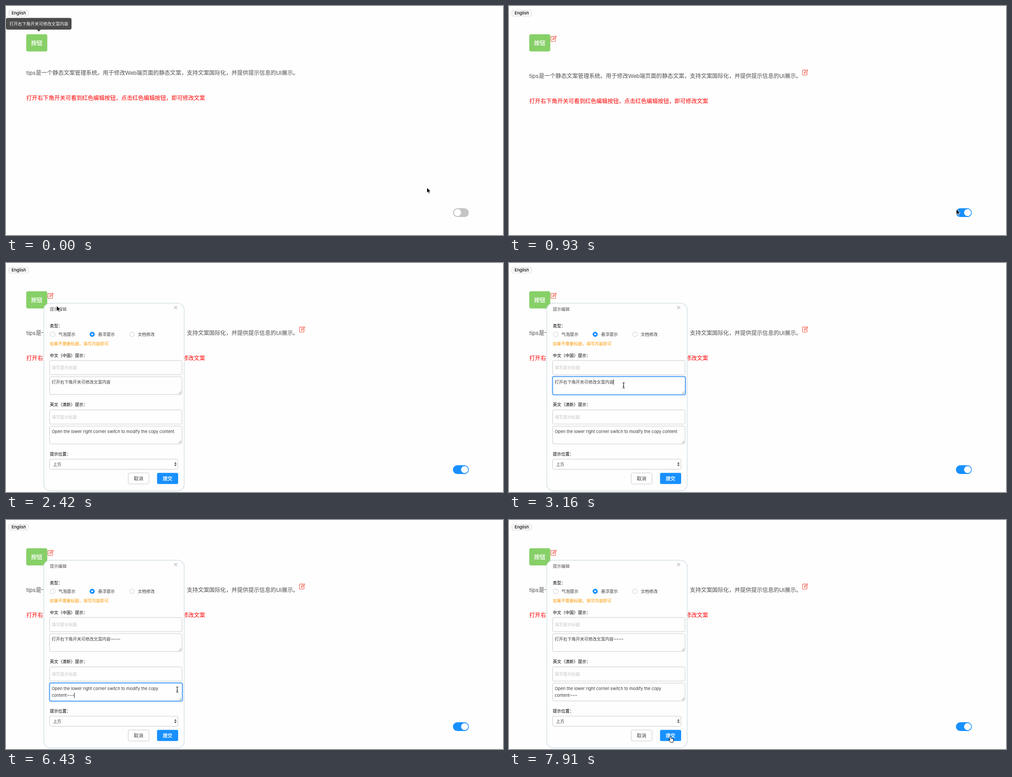
An HTML page for the animation above (8000 ms loop, 1100 px wide and 509 px high).

```html
<!DOCTYPE html>
<html lang="zh-CN">
<head>
<meta charset="utf-8">
<title>tips</title>
<style>
  html, body { margin: 0; width: 100%; height: 100%; overflow: hidden; background: #fefefe; }
  svg { display: block; width: 100%; height: 100%; }
  text { font: 9.29px "Liberation Sans", "Noto Sans CJK SC", "Noto Sans CJK", sans-serif; fill: #3c3c3c; white-space: pre; }
  .page { font-size: 12.36px; fill: #505050; }
  .latin { font-family: Inter, "Open Sans", sans-serif; }
  .lead { font-size: 12px; }
  .english { font-size: 9.24px; }
  .action { font-size: 10.6px; }
  .strong { fill: #fff; stroke: #fff; stroke-width: .3; }
  .label { fill: #000; }
  .hint { fill: #c6c6c6; }
  .box { fill: #fefefe; stroke: #c9c9c9; stroke-width: 1; }
  .ring { fill: none; stroke: #6cb0fb; stroke-width: 2.6; }
  .caret { fill: #111; }
  .edit { fill: none; stroke: #f2523f; stroke-width: 1.1; stroke-linejoin: round; stroke-linecap: round; }
  .pointer { fill: #000; stroke: #fff; stroke-width: 1; stroke-linejoin: round; }
</style>
</head>
<body>
<svg id="stage" viewBox="0 0 1100 509" xmlns="http://www.w3.org/2000/svg"></svg>
<script>
const LOOP = 8000;

const label = (x, y, content, attrs = '') => `<text x="${x}" y="${y}" ${attrs}>${content}</text>`;
const box = (x, y, w, h, attrs = 'class="box"', r = 3) =>
  `<rect x="${x}" y="${y}" width="${w}" height="${h}" rx="${r}" ${attrs}/>`;
const editIcon = (x, y) => `<g class="edit" transform="translate(${x} ${y})">
  <path d="M7.4 1.9H2.2Q.9 1.9 .9 3.2V11.7Q.9 13 2.2 13H9.7Q11 13 11 11.7V6.6"/>
  <path d="M4.7 9.2L5.3 6.8L10.9 1L12.8 2.8L7.1 8.6Z"/></g>`;
const radio = (x, name, on) => `<circle cx="${x}" cy="158.5" r="5.2" fill="${on ? '#1890ff' : '#fefefe'}"
  stroke="${on ? '#1890ff' : '#c9c9c9'}"/>${on ? `<circle cx="${x}" cy="158.5" r="2" fill="#fff"/>` : ''}
  ${label(x + 12.9, 162, name)}`;
const titleField = y => box(96.5, y, 293, 31.5) + label(101.3, y + 19.3, '填写提示标题', 'class="hint"');
const textArea = (y, id) => box(96.5, y, 293, 39.5) +
  box(96.3, y - .5, 294.3, 40.7, `class="ring" id="${id}"`) +
  `<path d="M382.5 ${y + 38}l5.5 -5.5M385.7 ${y + 38}l2.3 -2.3" stroke="#777" stroke-width=".9"/>`;

const page = `
  ${box(6.5, 9.8, 43, 12.4, 'fill="#fff" stroke="#cfcfcf"')}
  ${label(12.2, 19.3, 'English', 'class="latin" style="fill:#000;font-weight:500"')}
  ${box(44.8, 62.7, 46.6, 38.4, 'fill="#87d068"', 4)}
  ${label(55.6, 86.8, '按钮', 'class="page strong"')}
  <g id="copy">
    ${label(45, 153, '<tspan class="latin lead">tips</tspan><tspan x="66">是一个静态文案管理系统。用于修改Web端页面的静态文案，支持文案国际化，并提供提示信息的UI展示。</tspan>', 'class="page"')}
    ${label(45, 208.7, '打开右下角开关可看到红色编辑按钮，点击红色编辑按钮，即可修改文案', 'class="page" style="fill:#f00"')}
  </g>
  <g id="tooltip">
    ${box(0, 26.5, 145, 26, 'fill="#4b4b4b"', 4)}
    <path d="M68 52L72.6 57L77.2 52Z" fill="#4b4b4b"/>
    ${label(7.8, 42.8, '打开右下角开关可修改文案内容', 'style="fill:#fff"')}
  </g>
  <g id="icons">${editIcon(92, 65.7)}${editIcon(648.6, 140.5)}</g>
  ${box(989.2, 449.6, 35.1, 19.4, 'id="track"', 9.7)}
  <circle id="knob" cy="459.3" r="7.8" fill="#fff"/>`;

const dialog = `<g id="dialog">
  ${box(83.5, 89.5, 311, 417, 'fill="#fefefe" stroke="#dce7eb" stroke-width="2"', 15)}
  ${label(97, 106, '提示编辑', 'style="fill:#555"')}
  <path d="M372.2 95.7l6.6 6.6m0 -6.6l-6.6 6.6" stroke="#888" stroke-width="1"/>
  ${label(97, 143, '类型：', 'class="label"')}
  ${radio(103.4, '气泡提示')}${radio(190.8, '悬浮提示', true)}${radio(278.9, '文档修改')}
  ${label(97, 183.4, '如果不需要标题，填写内容即可', 'style="fill:#ff9900"')}
  ${label(97, 208.7, '中文（中国）提示：', 'class="label"')}
  ${titleField(216.7)}${textArea(252.8, 'ringZh')}
  ${label(101.3, 268.4, '打开右下角开关可修改文案内容')}
  ${label(231.4, 268.4, '', 'id="tildesZh"')}
  ${label(97, 318.4, '英文（澳新）提示：', 'class="label"')}
  ${titleField(326.5)}${textArea(362.6, 'ringEn')}
  ${label(101.3, 377.8, '', 'id="lineA" class="latin english"')}
  ${label(101.3, 393.3, 'content', 'id="lineB" class="latin english"')}
  ${label(0, 0, '', 'id="tildesEn"')}
  <rect id="caret" class="caret" width="1" height="11.5"/>
  ${label(97, 428, '提示位置：', 'class="label"')}
  ${box(96.5, 436, 284, 22.5)}
  ${label(104, 451, '上方')}
  <path d="M372.4 446.3L375 442.8L377.6 446.3ZM372.4 448.2L375 451.7L377.6 448.2Z" fill="#444"/>
  ${box(270.5, 466.7, 46, 24.5)}
  ${label(282.7, 482.8, '取消', 'class="action"')}
  ${box(334.3, 466.6, 46.7, 24.7, 'fill="#1890ff"')}
  ${label(347, 482.8, '提交', 'class="action strong"')}
</g>`;

const pointers = `
  <path id="arrow" class="pointer" d="M0 0V12L2.8 9.6L4.6 13.8L6.6 12.9L4.8 8.8H8.6Z"/>
  <path id="hand" class="pointer" style="fill:#fff;stroke:#000"
    d="M3.2 1.2Q4.4 .2 5 1.6L6 5Q7.2 4.3 7.8 5.4Q9 4.8 9.5 5.9Q10.8 5.6 10.9 7.2V10L9.8 13.6H4.4L.9 9.3Q-.2 7.6 1.2 7.4L3.4 8.8L2.4 2.6Q2.4 1.6 3.2 1.2Z"/>
  <path id="beam" d="M-2.6 -6Q0 -6 0 -4.6Q0 -6 2.6 -6M0 -5V5M-2.6 6Q0 6 0 4.6Q0 6 2.6 6M-1.4 1.7H1.4"
    fill="none" stroke="#111" stroke-width="1.1"/>`;

const stage = document.getElementById('stage');
stage.innerHTML = page + dialog + pointers;
const el = Object.fromEntries([...stage.querySelectorAll('[id]')].map(node => [node.id, node]));

// Each row: start time, then the values held until the next row.
const pointerSteps = [
  [0, 'arrow', 931.5, 403.5], [150, 'arrow', 940, 412], [310, 'arrow', 968, 437],
  [460, 'hand', 993, 454], [620, 'hand', 997, 457], [930, 'arrow', 990, 451.5],
  [1080, 'arrow', 380, 250], [1230, 'arrow', 235, 165], [1380, 'arrow', 145, 108],
  [1530, 'arrow', 112, 87], [1670, 'arrow', 104, 81], [1820, 'hand', 98.5, 76],
  [1970, 'hand', 97, 74.2], [2420, 'arrow', 112, 95], [2570, 'arrow', 155, 150],
  [2720, 'arrow', 208, 212], [2870, 'beam', 246, 262], [3010, 'beam', 253.6, 272],
  [4660, 'beam', 290, 298], [4800, 'beam', 352, 346], [4940, 'beam', 381, 370],
  [5090, 'beam', 379.5, 375], [5240, 'beam', 379, 377], [6880, 'beam', 379, 381],
  [7030, 'beam', 377, 390], [7180, 'arrow', 373, 408], [7330, 'arrow', 366, 435],
  [7470, 'arrow', 360, 458], [7620, 'hand', 355, 475], [7770, 'hand', 353, 480.5]
];
const focusSteps = [[0, ''], [3160, 'zh'], [5240, 'en'], [7770, '']];
const zhSteps = [[0, 0], [3910, 1], [4060, 2], [4210, 3], [4510, 4]];
const enSteps = [[0, 0], [5840, 1], [6280, 2], [6430, 3]];
const caretSteps = [[0, true], [3610, false], [3910, true], [4800, false], [5240, true], [6880, false], [7330, true]];

const at = (steps, t) => steps.findLast(step => step[0] <= t).slice(1);
const show = (node, on) => node.setAttribute('visibility', on ? 'visible' : 'hidden');
const place = (node, x, y) => { node.setAttribute('x', x); node.setAttribute('y', y); };
const TILDE = 5.43;

function render(t) {
  const on = t >= 770;
  show(el.tooltip, !on);
  show(el.icons, on);
  el.copy.setAttribute('transform', `translate(0 ${on ? 7.3 : 0})`);
  el.track.setAttribute('fill', on ? '#1890ff' : '#c5c5c5');
  el.knob.setAttribute('cx', on ? 1015 : 999.3);

  el.dialog.style.display = t >= 2270 ? '' : 'none';
  const [focus] = at(focusSteps, t);
  const [zh] = at(zhSteps, t);
  const [en] = at(enSteps, t);
  const wrapped = en > 2;
  show(el.ringZh, focus === 'zh');
  show(el.ringEn, focus === 'en');
  el.tildesZh.textContent = '~'.repeat(zh);
  el.lineA.textContent = 'Open the lower right corner switch to modify the copy' + (wrapped ? '' : ' content');
  show(el.lineB, wrapped);
  el.tildesEn.textContent = '~'.repeat(en);
  const endX = wrapped ? 134.8 : 373.4;
  place(el.tildesEn, endX, wrapped ? 393.3 : 377.8);

  show(el.caret, focus && at(caretSteps, t)[0]);
  if (focus === 'en') place(el.caret, endX + en * TILDE - .4, wrapped ? 384 : 368.5);
  else place(el.caret, 231 + zh * TILDE, 259);

  const [kind, x, y] = at(pointerSteps, t);
  for (const name of ['arrow', 'hand', 'beam']) show(el[name], name === kind);
  el[kind].setAttribute('transform', `translate(${x} ${y})`);
}

const start = performance.now();
function tick() {
  render((performance.now() - start) % LOOP);
  requestAnimationFrame(tick);
}
tick();
</script>
</body>
</html>
```
